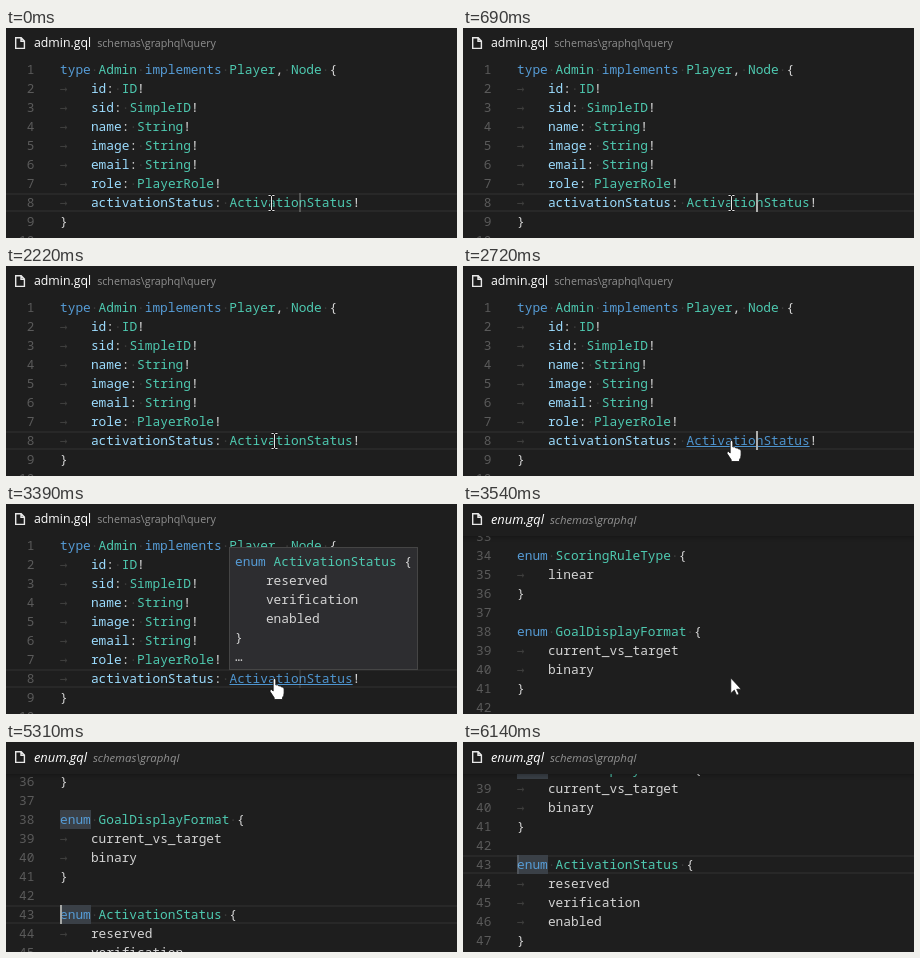
These frames come from a looping animation (451x210 px, 6240 ms). An HTML page:

```html
<!DOCTYPE html>
<html lang="en">
<head>
<meta charset="utf-8">
<title>Go to definition</title>
<style>
html, body { margin: 0; width: 100%; height: 100%; overflow: hidden; background: #1e1e1e; }
#stage { position: relative; width: 451px; height: 210px; overflow: hidden; background: #1e1e1e; }
#stage div, #stage svg { position: absolute; }
[hidden] { display: none !important; }

.title { left: 28px; top: 6px; font: 12.3px/18px "Open Sans", sans-serif; color: #fff; white-space: pre; }
.title span { margin-left: 6px; font-size: 10.7px; color: #909090; }
.title.preview { font-style: italic; font-size: 12.9px; }
.title.preview span { font-size: 11.4px; }
#page { left: 8px; top: 8px; }

.editor { left: 0; top: 32px; width: 451px; height: 178px; overflow: hidden; }
.code { font: 12.83px/19px "Noto Sans Mono", monospace; color: #d4d4d4; }
.doc { left: 0; width: 451px; }
.doc .text { left: 0; top: 0; }
#stage .line { position: relative; height: 19px; white-space: pre; }
.doc .line { padding-left: 54px; }
.line i { position: absolute; left: 0; width: 28.4px; text-align: right; font-style: normal; color: #5a5a5a; }
.line b { font-weight: normal; }
.line .key { color: #569cd6; }
.line .type { color: #4ec9b0; }
.line .field { color: #9cdcfe; }
.line .space { color: #3e3e3d; }
.line .tab { display: inline-block; width: 4ch; height: 19px; vertical-align: top; font-family: "DejaVu Sans Mono", monospace; color: #3e3e3d; }
.marked .key { display: inline-block; height: 19px; vertical-align: top; background: #3a4047; }
.linked .target { color: #4e94ce; text-decoration: underline; }

.current { left: 0; right: 0; height: 15px; border: solid #282828; border-width: 2px 0; }
.caret { width: 2px; height: 19px; background: #aeafad; }
.shadow { left: 0; top: 0; width: 100%; height: 6px; box-shadow: #0006 0 6px 6px -6px inset; }
#hover { left: 223px; top: 43px; width: 187px; height: 121px; background: #2d2d30; border: 1px solid #454545; }
#hover .code { left: 5px; top: 4px; }
#hover .space, #hover .tab { color: transparent; }
#pointer { left: 0; top: 0; }
</style>
</head>
<body>
<div id="stage">
  <svg id="page" width="12" height="14" fill="none" stroke="#e8e8e8" stroke-width="1.4">
    <path d="M1.7 1.7H7.2L10.4 5V12.4H1.7ZM7 1.7V5.2H10.4"/>
  </svg>

  <div id="admin">
    <div class="title">admin.gql<span>schemas\graphql\query</span></div>
    <div class="editor">
      <div class="doc code" style="top:0">
        <div class="current" style="top:133px"></div>
        <div class="text"></div>
        <div class="caret" style="left:293px;top:133px"></div>
      </div>
    </div>
    <div id="hover"><div class="code"></div></div>
  </div>

  <div id="enums">
    <div class="title preview">enum.gql<span>schemas\graphql</span></div>
    <div class="editor">
      <div class="doc code" style="top:-9px">
        <div class="current" style="top:190px"></div>
        <div class="text"></div>
        <div class="caret" style="left:54px;top:190px"></div>
      </div>
      <div class="shadow"></div>
    </div>
  </div>

  <svg id="pointer" width="451" height="210">
    <g id="beam" fill="none">
      <path d="M-3 -7.5H-1L0 -6.5L1 -7.5H3M0 -6.5V6.5M-3 7.5H-1L0 6.5L1 7.5H3" stroke="#111" stroke-width="2.4"/>
      <path d="M-3 -7.5H-1L0 -6.5L1 -7.5H3M0 -6.5V6.5M-3 7.5H-1L0 6.5L1 7.5H3" stroke="#e6e6e6"/>
    </g>
    <path id="arrow" d="M0 0V15.4L3.5 12.1L5.9 17.2L8.2 16.2L5.9 11.2H10.4Z" fill="#fff" stroke="#111" stroke-width=".7"/>
    <path id="hand" d="M-1.3 2Q-1.3 .5 0 .5T1.3 2V7Q3.6 6 4.2 8Q6.3 7.3 6.9 9Q9.6 8.4 9.6 11V15Q9.6 18 8 19.5V21.5H-.3V19.8L-4.4 13.6Q-5 11.4 -3.2 11.4L-1.3 13Z" fill="#fff" stroke="#111" stroke-width=".8"/>
  </svg>
</div>

<script>
const LOOP = 6240;
const $ = (s, root = document) => root.querySelector(s);

const adminText = `type Admin implements Player, Node {
\tid: ID!
\tsid: SimpleID!
\tname: String!
\timage: String!
\temail: String!
\trole: PlayerRole!
\tactivationStatus: ActivationStatus!
}
`;
const statusText = `enum ActivationStatus {
\treserved
\tverification
\tenabled
}`;
const enumText = `
enum ScoringRuleType {
\tlinear
}

enum GoalDisplayFormat {
\tcurrent_vs_target
\tbinary
}

${statusText}`;

const rules = /(?<key>\b(?:type|implements|enum)\b)|(?<type>\b[A-Z]\w*)|(?<field>\w+(?=:))|(?<space> )|(?<tab>\t)/g;
const glyphs = { space: "·", tab: "→" };

function paint(line) {
  return line.replace(rules, (token, ...rest) => {
    const groups = rest.at(-1);
    const kind = Object.keys(groups).find(k => groups[k]);
    return `<b class="${kind}">${glyphs[kind] || token}</b>`;
  });
}

function fill(el, text, first) {
  el.innerHTML = text.split("\n").map((line, i) =>
    `<div class="line">${first ? `<i>${first + i}</i>` : ""}${paint(line)}</div>`).join("");
}

const admin = $("#admin"), enums = $("#enums"), hover = $("#hover");
const enumDoc = $(".doc", enums);
fill($(".text", admin), adminText, 1);
fill($(".text", enums), enumText, 33);
fill($(".code", hover), statusText + "\n…");
[...admin.querySelectorAll(".text .type")].at(-1).classList.add("target");

// Moments at which the screen refreshes
const ticks = [0, 120, 270, 390, 540, 690, 970, 1120, 1390, 1540, 1670, 1950, 2100, 2220, 2350, 2470, 2580,
  2720, 2990, 3110, 3390, 3540, 3810, 3960, 4520, 4640, 4790, 4910, 5190, 5310, 5440, 5560, 5700, 5830, 6140];

// time, shape, x, y
const moves = [
  [0, "beam", 265.5, 175], [270, "beam", 267.5, 175], [390, "beam", 269.5, 175], [540, "beam", 268.5, 175],
  [970, "hand", 268.5, 174], [2220, "beam", 268.5, 175], [2720, "hand", 268.5, 174],
  [3540, "arrow", 267.8, 174], [3960, "beam", 269.5, 174], [4520, "beam", 290.5, 181],
  [4640, "beam", 316.5, 187], [4790, "beam", 317.5, 187], [4910, "beam", 309.5, 186], [5190, "none", 0, 0]
];
const shapes = ["beam", "arrow", "hand"].map(id => $("#" + id));

// Soft blink: 200 ms on, 300 ms fade, 200 ms off, 300 ms fade
function blink(t, start) {
  const x = (t - start + 4000) % 1000;
  const u = Math.min(1, Math.max(0, (Math.min(x, 1000 - x) - 100) / 300));
  return 1 - u * u * (3 - 2 * u);
}

function show(now) {
  const t = ticks.findLast(tick => tick <= now);
  const jumped = t >= 3540;
  const [, shape, x, y] = moves.findLast(m => m[0] <= t);

  admin.hidden = jumped;
  enums.hidden = !jumped;
  hover.hidden = t < 2990;
  admin.classList.toggle("linked", shape === "hand");
  enums.classList.toggle("marked", t >= 3810);
  enumDoc.style.top = -9 - (t >= 5440 ? 100 : t >= 5190 ? 50 : 0) + "px";
  $(".caret", jumped ? enums : admin).style.opacity = blink(t, jumped ? 460 : 720);

  for (const s of shapes) {
    s.style.display = s.id === shape ? "" : "none";
    s.setAttribute("transform", `translate(${x} ${y})`);
  }
}

const begin = performance.now();
function frame() {
  show((performance.now() - begin) % LOOP);
  requestAnimationFrame(frame);
}
frame();
</script>
</body>
</html>
```
